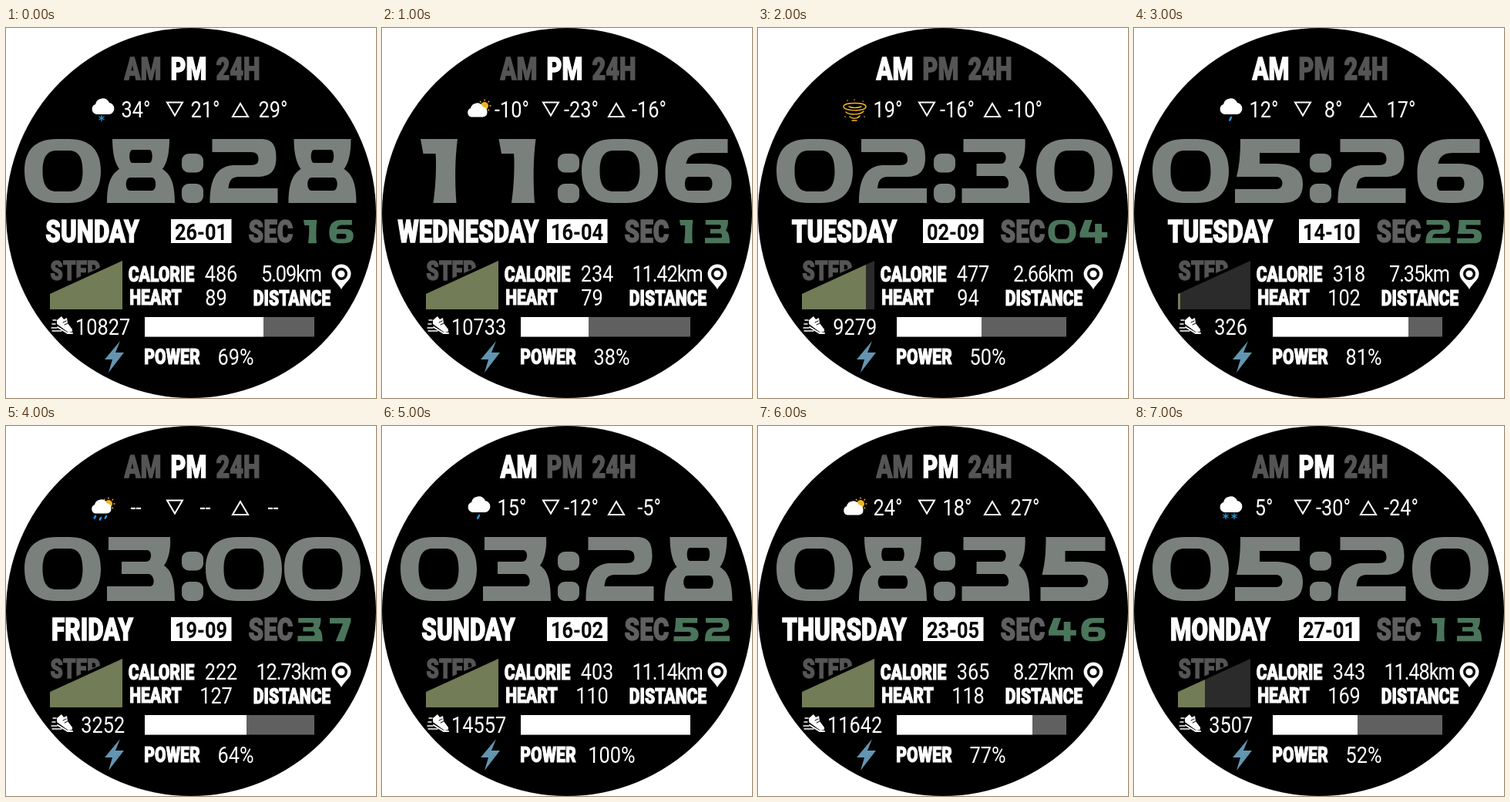
Write an HTML page that moves like this. It is 480 px wide and 480 px high and loops after 8 s.

```html
<!DOCTYPE html>
<html lang="en">
<head>
<meta charset="utf-8">
<title>Watch face</title>
<style>
html, body { margin: 0; width: 100%; height: 100%; overflow: hidden; background: #fff; }
svg { display: block; width: 100%; height: 100%; }
text { font-family: Roboto, sans-serif; fill: #fff; text-anchor: middle; }
.head { font-weight: 900; stroke: #fff; stroke-width: 1.4; }
.small { stroke-width: 1.2; }
.dim { fill: #555; stroke: #555; }
.sec { fill: #606060; stroke: #606060; }
.num { font-weight: 400; }
.km { letter-spacing: -1.3px; }
.date { font-weight: 700; fill: #000; }
.line { fill: none; stroke: #fff; stroke-width: 2; }
</style>
</head>
<body>
<svg id="face" viewBox="0 0 480 480"></svg>
<script>
(() => {
const face = document.getElementById('face');

// Wide display digits, centred on x = 0, 83 units high.
const GLYPHS = {
  0: 'M-8 0H8C36 0 49.5 15 49.5 41.5S36 83 8 83H-8C-36 83-49.5 68-49.5 41.5S-36 0-8 0Z'
    + 'M-8 15C-21 15-26 25-26 41.5S-21 68-8 68H8C21 68 26 58 26 41.5S21 15 8 15Z',
  1: 'M-23.5 0H24.5C21 26 21 56 23 83H-7C-3 56-3 28-4 19H-20Z',
  2: 'M-41 0H22C37 0 42 8 42 24C42 42 34 48 20 49H-6C-16 49-19 54-20 64H44V83H-44C-44 56-38 36-14 34H8C17 34 19 31 19 26C19 20 16 17 9 17H-41Z',
  3: 'M-42 0H38C39 15 36 29 30 37C40 44 44 56 44 83H-44V64H12C19 64 18 49 10 48H-25V32H7C15 32 15 17 8 17H-42Z',
  4: 'M-30 0H-4L-18 43H6V14H30V43H50V62H30V83H6V62H-48V46Z',
  5: 'M-37 0H40V18H-12V32H10C34 33 44 42 44 58C44 75 36 83 16 83H-44V65H10C20 65 20 50 10 49H-42C-38 34-37 18-37 0Z',
  6: 'M38 0H0C-30 0-43 16-43 45C-43 72-32 83 0 83C32 83 43 76 43 56C43 38 32 32 8 32H-16C-14 22-8 18 4 18H38Z'
    + 'M-13 49H12C20 49 20 67 12 67H-13C-19 67-19 49-13 49Z',
  7: 'M-41 0H34V14L10 83H-20L6 20H-41Z',
  8: 'M-37 0H37C37 18 34 31 28 39C39 46 44 58 44 83H-44C-44 58-39 46-28 39C-34 31-37 18-37 0Z'
    + 'M-11 14C-16 14-16 31-11 31H11C16 31 16 14 11 14Z'
    + 'M-14 50C-21 50-21 67-14 67H14C21 67 21 50 14 50Z'
};

const digit = (ch, x, y, s, fill) =>
  `<path transform="translate(${x} ${y}) scale(${s})" d="${GLYPHS[ch]}" fill="${fill}" fill-rule="evenodd"/>`;

// Condensed lettering: one squeeze factor per style.
const label = (str, x, y, cls, size, squeeze) =>
  `<text class="${cls}" font-size="${size}" transform="translate(${x} ${y}) scale(${squeeze} 1)">${str}</text>`;
const mode = (str, x, on) => label(str, x, 66.5, on ? 'head' : 'head dim', 41.5, 0.74);
const big = (str, x, cls = '') => label(str, x, 278.3, 'head ' + cls, 40, 0.785);
const small = (str, x, y) => label(str, x, y, 'head small', 28, 0.755);
const num = (str, x, y, cls = '') => label(str, x, y, 'num ' + cls, 30, 0.845);

const rect = (x, y, w, h, fill, extra = '') =>
  `<rect x="${x}" y="${y}" width="${w}" height="${h}" fill="${fill}" ${extra}/>`;
const stroke = (d, color, w) =>
  `<path d="${d}" fill="none" stroke="${color}" stroke-width="${w}" stroke-linecap="round"/>`;

const BLUE = '#2196e3', GOLD = '#f0b51e', GREY = '#7a807c', GREEN = '#4b755b';
const cloud = '<path d="M117 112a6.8 6.8 0 0 1-1-13a9.5 9.5 0 0 1 18-2a7.6 7.6 0 0 1 0 15z" fill="#fff"/>';
const lowCloud = `<g transform="translate(13 17) scale(.88)">${cloud}</g>`;
const drop = (x, y, l = 2.5) => stroke(`M${x} ${y}l${-l / 2} ${l}`, BLUE, 2.6);

function rays(x, y, r0, r1, n, color, w) {
  let d = '';
  for (let i = 0; i < n; i++) {
    const a = i * 2 * Math.PI / n + Math.PI / 2, c = Math.cos(a), s = Math.sin(a);
    d += `M${x + r0 * c} ${y + r0 * s}L${x + r1 * c} ${y + r1 * s}`;
  }
  return stroke(d, color, w);
}
const flake = (x, y) => rays(x, y, 0, 3.6, 6, BLUE, 1.3);
const sun = `<circle cx="133" cy="101" r="5" fill="${GOLD}"/>` + rays(133, 101, 7, 8, 8, GOLD, 1.4);

const ICONS = {
  snow: cloud + flake(124, 117),
  snows: cloud + flake(119, 117) + flake(130, 117),
  rain: cloud + drop(126, 116, 3.5),
  fair: sun + lowCloud,
  showers: sun + `<g transform="translate(0 -2)">${lowCloud}</g>`
    + drop(116, 117) + drop(123, 119) + drop(130, 117),
  wind: stroke('M111 102C111 96 140 96 140 102C140 109 111 108 111 102'
    + 'M114 109C118 113 133 113 137 108M119 115C122 118 129 118 132 114M122 120H128'
    + 'M118 102C122 104 129 104 134 102', GOLD, 1.5)
    + stroke('M116 94h.1M125 93h.1M136 95h.1M113 115h.1M138 115h.1', GOLD, 1.6)
};

const base = `
  <circle cx="240" cy="240" r="240"/>
  <path class="line" d="M209 96.5H229L219 113.5ZM294 115H314L304 98Z"/>
  ${rect(228, 163, 28, 24.5, GREY, 'rx="9"')}
  ${rect(228, 202, 28, 25, GREY, 'rx="9"')}
  ${rect(214, 248, 78.5, 31, '#fff')}
  ${big('SEC', 343.5, 'sec')}
  ${label('STEP', 90, 327, 'head dim', 35, 0.75)}
  <path d="M55 341L153 297V367H55Z"/>
  <path d="M57 345L151 302V365H57Z" fill="#2b2b2b"/>
  <clipPath id="wedge"><path d="M57 345L151 302V365H57Z"/></clipPath>
  ${small('CALORIE', 201.5, 328.8)}${small('HEART', 194, 358.7)}
  ${small('DISTANCE', 371, 360.2)}${small('POWER', 215.5, 436.3)}
  <path d="M435 339C431 331 422.5 327 422.5 319a12.5 12.5 0 0 1 25 0C447.5 327 439 331 435 339Z" fill="#fff"/>
  <circle cx="435" cy="319" r="6.3" fill="#fff" stroke="#000" stroke-width="3.4"/>
  <path d="M148 406L128 430H138L133 447L153 421H142Z" fill="#6495b0"/>
  <path d="M66 379L72 374L75 378L79 376L80 383L86 391V394L81 395L66 384Z" fill="#fff"/>
  ${stroke('M67 388L80 396H86', '#fff', 2)}
  ${stroke('M61 379H65M60 384H64M59 389H66M60 393H72', '#fff', 1.5)}
  ${stroke('M74 382L78 380M76 385L80 383', '#000', 1)}
  ${rect(180, 375, 220, 25.5, '#606060')}`;

const keys = ['pm', 'time', 'sec', 'day', 'date', 'icon', 'now', 'low', 'high',
  'cal', 'heart', 'km', 'steps', 'goal', 'power'];
const states = [
  [1, '0828', '16', 'SUNDAY', '26-01', 'snow', '34°', '21°', '29°', 486, 89, '5.09', 10827, 94, 69],
  [1, '1106', '13', 'WEDNESDAY', '16-04', 'fair', '-10°', '-23°', '-16°', 234, 79, '11.42', 10733, 94, 38],
  [0, '0230', '04', 'TUESDAY', '02-09', 'wind', '19°', '-16°', '-10°', 477, 94, '2.66', 9279, 83, 50],
  [0, '0526', '25', 'TUESDAY', '14-10', 'rain', '12°', '8°', '17°', 318, 102, '7.35', 326, 3, 81],
  [1, '0300', '37', 'FRIDAY', '19-09', 'showers', '--', '--', '--', 222, 127, '12.73', 3252, 94, 64],
  [0, '0328', '52', 'SUNDAY', '16-02', 'rain', '15°', '-12°', '-5°', 403, 110, '11.14', 14557, 94, 100],
  [1, '0835', '46', 'THURSDAY', '23-05', 'fair', '24°', '18°', '27°', 365, 118, '8.27', 11642, 94, 77],
  [1, '0520', '13', 'MONDAY', '27-01', 'snows', '5°', '-30°', '-24°', 343, 169, '11.48', 3507, 35, 52]
].map(row => Object.fromEntries(keys.map((k, i) => [k, row[i]])));

const CELLS = [73.5, 175, 308.5, 410.5];

function draw(s) {
  const bar = Math.round(s.power / 10) * 22;
  face.innerHTML = base
    + mode('AM', 177.5, !s.pm) + mode('PM', 237, s.pm) + mode('24H', 301, false)
    + ICONS[s.icon]
    + num(s.now, 168.5, 116) + num(s.low, 258.5, 116) + num(s.high, 346.5, 116)
    + CELLS.map((x, i) => digit(s.time[i], x, 144, 1, GREY)).join('')
    + big(s.day, 112) + num(s.date, 253, 275, 'date')
    + digit(s.sec[0], 394.5, 249, 0.365, GREEN)
    + digit(s.sec[1], 435, 249, 0.365, GREEN)
    + rect(57, 300, s.goal, 66, '#727c56', 'clip-path="url(#wedge)"')
    + num(s.cal, 279, 329) + num(s.heart, 272.5, 360)
    + num(s.km + 'km', 370, 329, 'km')
    + num(s.steps, 125.7, 398)
    + rect(180, 375, bar, 25.5, '#fff')
    + num(s.power + '%', 298, 437);
}

let shown = -1;
function tick() {
  const i = Math.floor(performance.now() / 1000) % states.length;
  if (i !== shown) draw(states[shown = i]);
  requestAnimationFrame(tick);
}
tick();
})();
</script>
</body>
</html>
```
